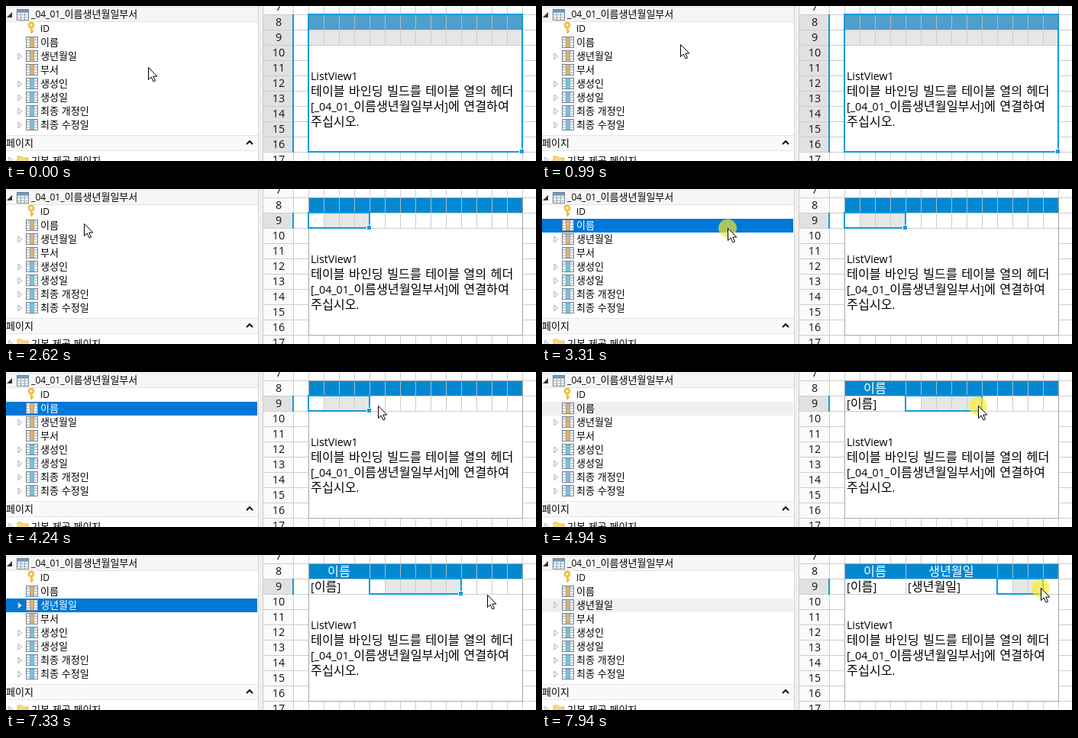
Animation of 694x203 px, one loop 8 s. Source, as an HTML page with a canvas:

```html
<!DOCTYPE html>
<html lang="ko">
<head>
<meta charset="utf-8">
<title>ListView binding</title>
<style>
html, body { margin: 0; width: 100%; height: 100%; overflow: hidden; background: #fff; }
canvas { display: block; }
</style>
</head>
<body>
<canvas id="stage" width="694" height="203"></canvas>
<script>
const ctx = document.getElementById('stage').getContext('2d');
const LOOP = 8000;
const BLUE = '#0288d1', EDGE = '#119bdb', GRID = '#cdcdcd';
const LEFT = 396, TOP = 11, CELL = 20, COLS = 14;
const RUNS = /[\uac00-\ud7a3]+|[^\uac00-\ud7a3 ]+| /g;

const easeOut = p => 1 - (1 - p) ** 2;
const easeIn = p => p * p;
const easeBoth = p => p * p * (3 - 2 * p);
const linear = p => p;

// Pointer path; "drag" moves begin at the resting point on their first step.
const moves = [
  { from: 70, to: 600, n: 8, x: 60, y: 43, ease: easeBoth },
  { from: 750, to: 1450, n: 10, x: 409, y: 43, via: [230, 58], ease: easeBoth },
  { from: 1600, to: 2070, n: 7, x: 465, y: 40, drag: true },
  { from: 2240, to: 2850, n: 9, x: 57, y: 46, ease: easeOut },
  { from: 3000, to: 3710, n: 10, x: 445, y: 44, via: [300, 57], drag: true, ease: easeBoth },
  { from: 3860, to: 3940, n: 2, x: 491, y: 44 },
  { from: 4090, to: 4320, n: 4, x: 484, y: 44, ease: easeIn },
  { from: 4550, to: 4940, n: 6, x: 571, y: 44, drag: true },
  { from: 5090, to: 5170, n: 2, x: 589, y: 46 },
  { from: 5720, to: 6024, n: 5, x: 58, y: 66, ease: easeBoth },
  { from: 6100, to: 6480, n: 6, x: 446, y: 52, via: [300, 68], drag: true, ease: easeBoth },
  { from: 6560, to: 6790, n: 4, x: 512, y: 44 },
  { from: 7020, to: 7180, n: 3, x: 634, y: 45 },
  { from: 7330, to: 7650, n: 5, x: 608, y: 43, via: [626, 68] },
  { from: 7880, to: 7940, n: 2, x: 653, y: 43 }
];

const pressed = [[1600, 2240], [3000, 3860], [4550, 5720], [6100, 7020], [7880, 8000]];
const carrying = [[3000, 3860], [6100, 7020]];
const selections = [
  { at: 1600, until: 2240, col: 0 },
  { at: 4550, until: 5720, col: 4 },
  { at: 7880, until: 8000, col: 10 }
];
const within = (spans, t) => spans.some(([a, b]) => t >= a && t < b);

function pointer(t) {
  let x = 186, y = 80;
  for (const m of moves) {
    if (t < m.from) break;
    const gap = (m.to - m.from) / (m.n - 1);
    const k = Math.min(m.n - 1, Math.floor((t - m.from + 6) / gap));
    const p = (m.ease || linear)(m.drag ? k / (m.n - 1) : (k + 1) / m.n);
    const [vx, vy] = m.via || [(x + m.x) / 2, (y + m.y) / 2];
    const q = 1 - p;
    x = q * q * x + 2 * q * p * vx + p * p * m.x;
    y = q * q * y + 2 * q * p * vy + p * p * m.y;
  }
  return { x: Math.round(x), y: Math.round(y) };
}

function rect(x, y, w, h, color) {
  ctx.fillStyle = color;
  ctx.fillRect(x, y, w, h);
}

function frame(x, y, w, h, color) {
  ctx.strokeStyle = color;
  ctx.lineWidth = 1;
  ctx.strokeRect(x + .5, y + .5, w - 1, h - 1);
}

function poly(points, fill, stroke) {
  ctx.beginPath();
  points.forEach(([x, y]) => ctx.lineTo(x, y));
  ctx.closePath();
  if (fill) { ctx.fillStyle = fill; ctx.fill(); }
  if (stroke) { ctx.strokeStyle = stroke; ctx.lineWidth = 1; ctx.stroke(); }
}

// Latin and Hangul runs use their own sizes.
const TREE = { latin: 12, hangul: 13, space: 3.8 };
const SHEET = { latin: 14.2, hangul: 16.2, space: 5.4 };

function text(s, x, y, style, color = '#000') {
  ctx.fillStyle = color;
  for (const run of s.match(RUNS)) {
    if (run === ' ') { x += style.space; continue; }
    const size = /[\uac00-\ud7a3]/.test(run) ? style.hangul : style.latin;
    ctx.font = `${size}px "Open Sans", "Noto Sans CJK KR", "Noto Sans CJK", sans-serif`;
    ctx.fillText(run, x, y);
    x += ctx.measureText(run).width;
  }
}

function tableIcon(x, y, head, accent) {
  rect(x, y, 16, 15, '#fff');
  rect(x, y, 16, 4, head);
  if (accent) rect(x + 5, y + 1, 6, 13, accent);
  for (const i of [5, 10]) rect(x + i, y, 1, 15, '#8d9aa6');
  for (const i of [4, 7, 11]) rect(x, y + i, 16, 1, '#a9b4be');
  frame(x, y, 16, 15, '#74828f');
}

function keyIcon(x, y) {
  ctx.strokeStyle = '#f0c04a';
  ctx.lineWidth = 3;
  ctx.beginPath();
  ctx.arc(x, y - 3, 3, 0, 7);
  ctx.stroke();
  rect(x - 1, y, 2.5, 8, '#f0c04a');
  rect(x + 1, y + 3, 2, 3, '#f0c04a');
}

function branch(x, y) {
  poly([[x - 2, y - 4], [x + 2.5, y], [x - 2, y + 4]], '#fff', '#a6a6a6');
}

const ORANGE = '#f6b04c', CYAN = '#5cc8f2';
const fields = [
  ['이름', ORANGE, false], ['생년월일', ORANGE, true], ['부서', ORANGE, false],
  ['생성인', CYAN, true], ['생성일', CYAN, true],
  ['최종 개정인', CYAN, true], ['최종 수정일', CYAN, true]
];

function rowState(t) {
  if (t < 3000) return [-1];
  if (t < 4312) return [0, true];
  if (t < 6100) return [0, false];
  return [1, t < 7480];
}

function drawTree(t) {
  rect(0, 0, 330, 203, '#fff');
  rect(0, 1, 330, 20, '#f5f5f5');
  rect(0, 1, 330, 1, '#e3e3e3');
  rect(0, 20, 330, 1, '#e3e3e3');
  poly([[8, 8], [8, 15], [1, 15]], '#333');
  tableIcon(14, 4, '#5b9bd5');
  text('_04_01_이름생년월일부서', 33, 15, TREE);
  keyIcon(33, 28);
  text('ID', 45, 34, TREE);

  const [picked, active] = rowState(t);
  fields.forEach(([name, accent, open], i) => {
    const y = 48 + i * 18, on = i === picked;
    if (on) rect(0, y - 9, 329, 18, active ? '#0078d7' : '#f0f0f0');
    if (open) branch(18, y);
    tableIcon(26, y - 8, '#dfe5ea', accent);
    text(name, 45, y + 4, TREE, on && active ? '#fff' : '#000');
  });

  rect(0, 170, 330, 20, '#f9f9f9');
  rect(0, 169, 330, 1, '#e4e4e4');
  rect(0, 189, 330, 1, '#e4e4e4');
  text('페이지', 0, 184, TREE);
  ctx.strokeStyle = '#111';
  ctx.lineWidth = 2;
  ctx.beginPath();
  ctx.moveTo(315, 181);
  ctx.lineTo(319, 177);
  ctx.lineTo(323, 181);
  ctx.stroke();
  branch(6, 202);
  poly([[15, 197], [20, 197], [22, 199], [29, 199], [29, 210], [15, 210]], '#fbd977', '#e6b94e');
  text('기본 제공 페이지', 33, 207, TREE);
}

function drawBoard(t) {
  rect(330, 0, 364, 203, '#fff');
  rect(330, 0, 7, 203, '#f0f0f0');
  rect(330, 0, 1, 203, '#d4d4d4');
  rect(336, 0, 1, 203, '#cdcdcd');
  rect(337, 0, 39, 203, '#fafafa');
  const whole = t < 1600;
  const y0 = whole ? 11 : 31, h = whole ? 180 : 20;
  rect(337, y0, 39, h, '#e1e1e1');
  for (let y = TOP; y < 203; y += CELL) rect(337, y, 357, 1, GRID);
  for (let x = 376; x < 694; x += CELL) rect(x, 0, 1, 203, GRID);
  rect(375, y0, 2, h + 1, EDGE);
  ctx.textAlign = 'center';
  ctx.font = '14.3px "Open Sans", sans-serif';
  ctx.fillStyle = '#111';
  for (let n = 7; n <= 17; n++) ctx.fillText(n, 357, 26 + (n - 8) * CELL);
  ctx.textAlign = 'left';
}

function bound(col, span, name) {
  const x = LEFT + col * CELL, w = span * CELL;
  rect(x + 1, 12, w - 1, 19, BLUE);
  rect(x + 1, 32, w - 1, 19, '#fff');
  const width = name.length * 15;
  text(name, x + (w - width) / 2, 27, SHEET, '#fff');
  text(`[${name}]`, x + 3, 47, SHEET);
}

function outline(x, y, w, h, handle) {
  ctx.strokeStyle = EDGE;
  ctx.lineWidth = 2;
  ctx.strokeRect(x, y, w, h);
  if (handle) {
    rect(x + w - 4, y + h - 4, 7, 7, '#fff');
    rect(x + w - 3, y + h - 3, 5, 5, EDGE);
  }
}

function drawList(t) {
  const whole = t < 1600;
  rect(LEFT, TOP, 280, 20, whole ? '#4f9fcc' : BLUE);
  rect(LEFT, 31, 280, 20, whole ? '#e6e6e6' : '#fff');
  rect(LEFT, 51, 280, 140, '#fff');

  const sel = selections.filter(s => t >= s.at).pop();
  let last = 0;
  if (sel) {
    last = Math.floor((pointer(Math.min(t, sel.until - 1)).x - LEFT) / CELL);
    rect(LEFT + (sel.col + 1) * CELL, 31, (last - sel.col) * CELL, 20, '#e6e6e6');
  }
  for (let c = 0; c <= COLS; c++) {
    rect(LEFT + c * CELL, TOP, 1, 20, '#a9bcc8');
    rect(LEFT + c * CELL, 31, 1, 20, GRID);
  }
  rect(LEFT, 31, 280, 1, GRID);
  rect(LEFT, 51, 280, 1, GRID);
  frame(LEFT, TOP, 281, 181, '#a6a6a6');

  if (t >= 4312) bound(0, 4, '이름');
  if (t >= 7480) bound(4, 6, '생년월일');

  text('ListView1', 399, 97, SHEET);
  text('테이블 바인딩 빌드를 테이블 열의 헤더', 399, 117, SHEET);
  text('[_04_01_이름생년월일부서]에 연결하여', 399, 137, SHEET);
  text('주십시오.', 399, 157, SHEET);

  if (whole) outline(LEFT, TOP, 280, 180, true);
  else outline(LEFT + sel.col * CELL, 31, (last - sel.col + 1) * CELL, 20, t >= sel.until);
}

function drawPointer(t) {
  const { x, y } = pointer(t);
  if (within(pressed, t)) {
    ctx.fillStyle = 'rgba(255, 236, 40, .66)';
    ctx.beginPath();
    ctx.arc(x, y + .5, 12, 0, 7);
    ctx.fill();
  }
  const shape = [[0, 0], [0, 16], [3.7, 12.5], [6.5, 18.5], [9, 17.4], [6.3, 11.6], [11.3, 11.6]];
  poly(shape.map(([a, b]) => [x + a + .5, y + b + .5]), '#fff', '#000');
  if (within(carrying, t) && x > 337) {
    ctx.strokeStyle = '#000';
    ctx.lineWidth = 2;
    ctx.strokeRect(x + 2, y + 18, 12, 7);
    rect(x + 9, y + 20, 11, 11, '#fff');
    frame(x + 9, y + 20, 11, 11, '#000');
    rect(x + 11, y + 25, 7, 1, '#000');
    rect(x + 14, y + 22, 1, 7, '#000');
  }
}

function draw(now) {
  const t = now % LOOP;
  drawTree(t);
  drawBoard(t);
  drawList(t);
  drawPointer(t);
}

const start = performance.now();
function tick() {
  draw(performance.now() - start);
  requestAnimationFrame(tick);
}
tick();
</script>
</body>
</html>
```
